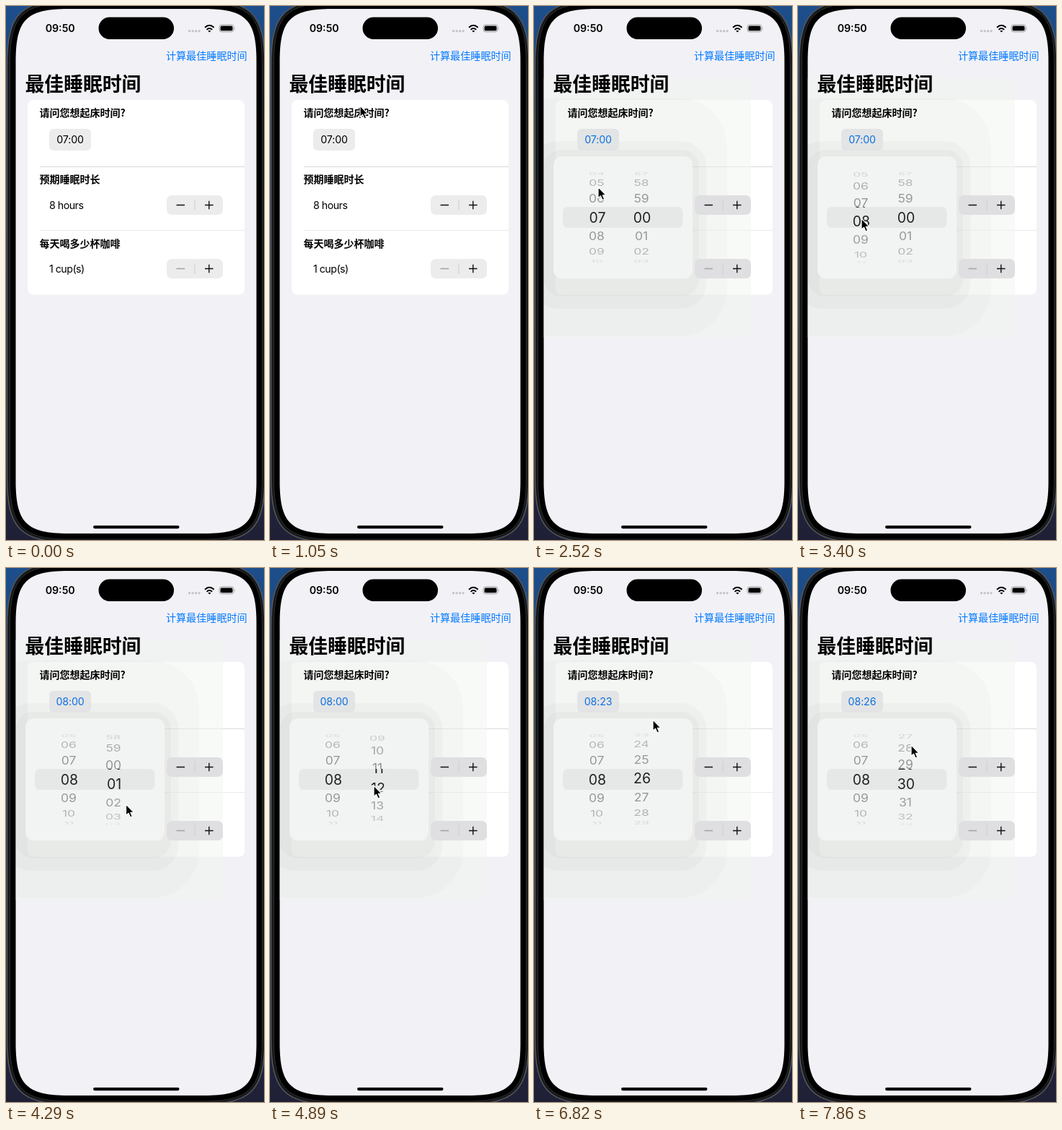
An HTML page for the animation above (8 s loop, 358x739 px).

```html
<!DOCTYPE html>
<html lang="zh">
<head>
<meta charset="utf-8">
<title>最佳睡眠时间</title>
<style>
  html, body { margin: 0; width: 100%; height: 100%; overflow: hidden; background: #14263f; }
  svg { display: block; width: 358px; height: 739px; }
  text { font-family: Inter, "Noto Sans", sans-serif; font-size: 14.2px; white-space: pre; }
  .zh { font-family: "Noto Sans CJK SC", "Noto Sans CJK", "Noto Sans CJK JP", sans-serif; font-size: 14px; }
  .bold { font-weight: 700; }
  .body { letter-spacing: -.5px; }
  .time { letter-spacing: -.1px; text-anchor: middle; }
  .wheel text { text-anchor: middle; }
  .outer text { font-size: 17.5px; }
  .inner text { font-size: 19.5px; fill: #202121; }
</style>
</head>
<body>
<svg viewBox="0 0 358 739">
  <defs>
    <linearGradient id="wall" x2="0" y2="1">
      <stop stop-color="#1d4f8c"/>
      <stop offset=".3" stop-color="#1b3a63"/>
      <stop offset=".75" stop-color="#222b45"/>
      <stop offset="1" stop-color="#1f2036"/>
    </linearGradient>
    <clipPath id="screen"><path id="glass"/></clipPath>
    <clipPath id="bar"><rect x="40" y="278" width="167" height="29"/></clipPath>
    <clipPath id="around"><path d="M40 229H207V278H40ZM40 307H207V356H40Z"/></clipPath>
    <clipPath id="panelClip"><rect id="panelMask" x="27" y="208" width="193" height="169.500" rx="12"/></clipPath>
    <g id="stepper">
      <rect x="223" y="-13.500" width="78" height="27" rx="7"/>
      <path d="M262 -7.500V7.500" stroke="#cfcfd1"/>
      <path d="M276 0H287.500M281.750 -5.750V5.750" stroke="#111" stroke-width="1.4"/>
    </g>
  </defs>

  <rect width="358" height="739" fill="url(#wall)"/>
  <path id="body" fill="#17181a" stroke="#55585c" stroke-width="1.500"/>
  <path id="bezel" stroke="#2c2d30"/>

  <g clip-path="url(#screen)">
    <rect width="358" height="739" fill="#f2f1f6"/>
    <rect x="30" y="130" width="301" height="269.500" rx="8" fill="#fff"/>
    <path d="M47 222.500H331" stroke="#d9d9dc"/>
    <path d="M47 310.500H331" stroke="#e9e9ec"/>
    <text class="zh bold" x="46.500" y="240" dy="5.300">预期睡眠时长</text>
    <text class="zh bold" x="46.500" y="328.500" dy="5.300">每天喝多少杯咖啡</text>
    <text class="body" x="60" y="280.500">8 hours</text>
    <text class="body" x="60" y="369">1 cup(s)</text>

    <g id="shade" fill="#000">
      <rect x="-40" y="100" width="341" height="359" rx="3" fill="#f1f5ef" fill-opacity=".5"/>
      <rect x="-40" y="128" width="308" height="329" rx="66" fill-opacity=".014"/>
      <rect x="-2" y="187" width="241.500" height="232" rx="36" fill-opacity=".025"/>
      <rect x="14" y="199" width="215" height="203" rx="24" fill-opacity=".022"/>
    </g>

    <g id="steppers">
      <use href="#stepper" y="275.500"/>
      <use href="#stepper" y="363.500"/>
    </g>
    <path d="M236.500 275.500H248" stroke="#111" stroke-width="1.4"/>
    <path d="M236.500 363.500H248" stroke="#a2a2a4" stroke-width="1.4"/>

    <text class="zh bold" x="46.500" y="153.300">请问您想起床时间?</text>
    <rect id="button" x="60" y="170" width="58" height="30" rx="6"/>
    <text id="wake" class="time" x="89" y="190.200">07:00</text>

    <g id="popover">
      <g clip-path="url(#panelClip)">
        <rect x="27" y="208" width="193" height="169.500" fill="#f2f4f3"/>
        <rect x="40" y="278" width="166.500" height="29" rx="7" fill="#e6e8e7"/>
        <g id="outer" class="wheel outer" clip-path="url(#around)"/>
        <g id="inner" class="wheel inner" clip-path="url(#bar)"/>
      </g>
    </g>

    <text x="54.700" y="36.200" font-weight="600">09:50</text>
    <rect x="128.500" y="15.500" width="104.500" height="30.500" rx="15.250"/>
    <path d="M254.500 34.700H268.500" stroke="#c3c2c8" stroke-width="3.200" stroke-linecap="round" stroke-dasharray="0 4.500"/>
    <g fill="none" stroke="#000" stroke-width="2">
      <path d="M276 29.800Q282.300 23.800 288.600 29.800M278.500 32.700Q282.300 29.300 286.100 32.700"/>
      <path d="M282.300 36.500L280.300 34.500Q282.300 33 284.300 34.500Z" fill="#000" stroke="none"/>
    </g>
    <rect x="296" y="26" width="20" height="9.800" rx="3.200" fill="none" stroke="#9b9ba0"/>
    <rect x="297.500" y="27.500" width="17" height="6.800" rx="1.900"/>
    <path d="M317.500 29.500Q319 31 317.500 32.500Z" fill="#9b9ba0"/>

    <text class="zh" x="334.700" y="74.300" fill="#007aff" text-anchor="end" style="font-size:14.1px">计算最佳睡眠时间</text>
    <text class="zh bold" x="26.500" y="117.800" style="font-size:26.8px">最佳睡眠时间</text>
    <rect x="121" y="719" width="119.500" height="4.200" rx="2.100"/>
  </g>

  <path id="cursor" d="M0 0V15.500L3.500 12.300L6 18L8.700 16.800L6.300 11.300H11Z" stroke="#fff" stroke-width="1.200" stroke-linejoin="round"/>
</svg>

<script>
const LOOP = 8000, START = 450, STEP = 148;
const TILT = 24 * Math.PI / 180, RADIUS = 64, CENTER = 292.5;
const $ = id => document.getElementById(id);

// Key poses: [step, value, ...]
const cursorPath = [
  [0, 235, 279], [1, 214, 240], [2, 184, 190], [3, 150, 148], [4, 125, 138], [5, 98, 160],
  [6, 88, 183], [13, 88, 183], [15, 90, 318], [17, 89, 316], [20, 88, 294], [21, 90, 296],
  [23, 188, 325], [25, 188, 325], [27, 145, 329], [30, 144, 301], [31, 145, 290],
  [34, 150, 320], [38, 164, 231], [39, 164, 231], [40, 160, 290], [43, 165, 210],
  [44, 165, 210], [46, 158, 290], [47, 157, 300], [50, 157, 245]
];
const hourPath = [[16, 7], [20, 7.78], [22, 8]];
const minutePath = [
  [25, 0], [27, 1.5], [30, 11.58], [33, 15], [35, 17.5], [38, 23.15], [40, 23],
  [41, 23], [43, 26.07], [44, 26], [47, 26], [50, 29.77]
];
// Popover: x, y, scale, height, opacity
const popPath = [[10, 50, 203, .59, 105, .5], [11, 37, 206, .84, 150, .88], [12, 27, 208, 1, 169.5, 1]];
const labels = [[45, "08:26"], [41, "08:23"], [22, "08:00"], [-1, "07:00"]];

// Rectangle whose corners ease into the sides, as on the phone's case
function smoothBox(id, left, top, right, bottom, radius) {
  const far = radius * 1.45, near = radius * .298;
  $(id).setAttribute("d", `M${left + far} ${top}
    H${right - far}C${right - near} ${top} ${right} ${top + near} ${right} ${top + far}
    V${bottom - far}C${right} ${bottom - near} ${right - near} ${bottom} ${right - far} ${bottom}
    H${left + far}C${left + near} ${bottom} ${left} ${bottom - near} ${left} ${bottom - far}
    V${top + far}C${left} ${top + near} ${left + near} ${top} ${left + far} ${top}Z`);
}
smoothBox("body", 1.5, -8, 359, 742, 62);
smoothBox("bezel", 5.5, -4, 355.5, 738, 58);
smoothBox("glass", 13.5, 4, 347.5, 730, 50);

function sample(path, step) {
  const next = path.findIndex(key => key[0] > step);
  if (next === 0) return path[0].slice(1);
  if (next < 0) return path[path.length - 1].slice(1);
  const a = path[next - 1], b = path[next], mix = (step - a[0]) / (b[0] - a[0]);
  return a.slice(1).map((v, i) => v + (b[i + 1] - v) * mix);
}

function makeWheel(x, count) {
  const rows = ["outer", "inner"].flatMap(layer => Array.from({ length: 7 }, (_, i) => {
    const node = document.createElementNS("http://www.w3.org/2000/svg", "text");
    $(layer).append(node);
    return { node, layer, offset: i - 3 };
  }));
  return value => {
    const middle = Math.round(value);
    for (const { node, layer, offset } of rows) {
      const angle = (middle + offset - value) * TILT, squash = Math.max(0, Math.cos(angle));
      const isOuter = layer === "outer";
      node.textContent = String((middle + offset + count) % count).padStart(2, "0");
      node.setAttribute("y", isOuter ? 6.4 : 7.1);
      node.setAttribute("transform",
        `translate(${isOuter ? x - 1 : x} ${CENTER + RADIUS * Math.sin(angle)}) scale(1 ${squash})`);
      if (isOuter) node.setAttribute("opacity", .42 * squash ** 1.2);
    }
  };
}
const setHour = makeWheel(88, 24), setMinute = makeWheel(150, 60);

function draw(time) {
  const step = Math.floor((time - START + 14) / STEP);
  const [x, y] = sample(cursorPath, step);
  $("cursor").setAttribute("transform", `translate(${x} ${y})`);
  $("cursor").style.display = step < 0 ? "none" : "";

  const [px, py, scale, height, alpha] = sample(popPath, step);
  const pop = $("popover");
  pop.style.display = step < 10 ? "none" : "";
  pop.setAttribute("opacity", alpha);
  pop.setAttribute("transform", `translate(${px} ${py}) scale(${scale}) translate(-27 -208)`);
  $("panelMask").setAttribute("height", height);
  $("shade").setAttribute("opacity", step < 10 ? 0 : [.25, .7][step - 10] ?? 1);

  const open = step >= 11;
  $("steppers").setAttribute("fill", open ? "#dfdfe1" : "#ececed");
  $("button").setAttribute("fill", open ? "#e3e4e5" : step >= 7 ? "#e9e9ea" : "#ececed");
  $("wake").setAttribute("fill", step < 7 ? "#000" : open ? "#0b70e2" : "#1a82f7");
  $("wake").textContent = labels.find(([from]) => step >= from || from < 0)[1];

  setHour(sample(hourPath, step)[0]);
  setMinute(sample(minutePath, step)[0]);
}

const begin = performance.now();
function tick() {
  draw((performance.now() - begin) % LOOP);
  requestAnimationFrame(tick);
}
tick();
</script>
</body>
</html>
```
